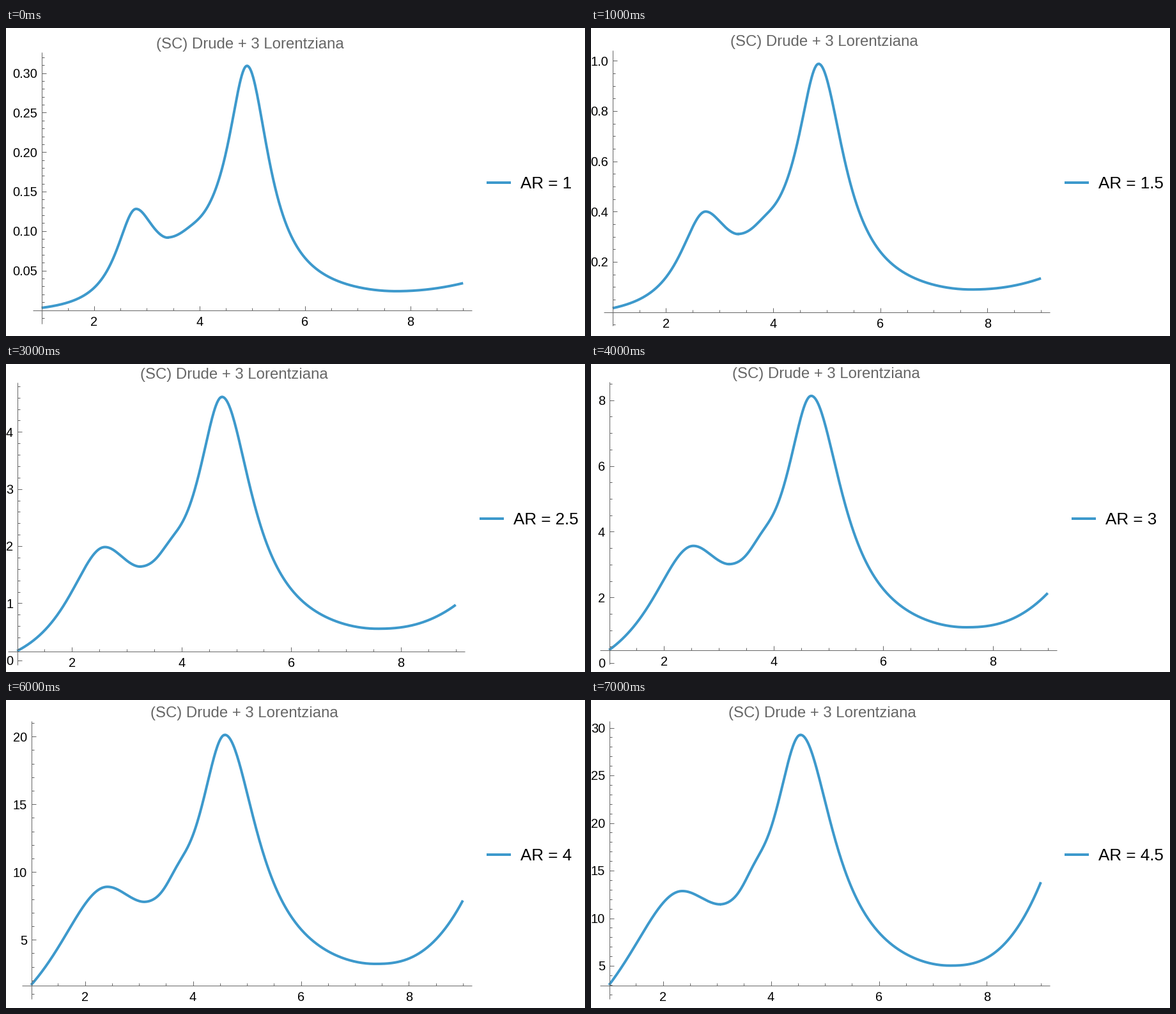
A matplotlib script that plays this animation: 906 px wide and 482 px high, repeating every 8 s.

```python
import numpy as np
import matplotlib.pyplot as plt
from matplotlib.animation import FuncAnimation

W, H, DPI = 906, 482, 64
PX = 72 / DPI  # points per pixel
BLUE, GRAY = "#3d99cc", "#666666"
FRAMES = 8
DIGIT, DOT = 11.12, 5.56  # advance widths in tick labels
plt.rcParams["font.family"] = "Liberation Sans"


def poly(w, *coeffs):
    return sum(c * w**i for i, c in enumerate(coeffs))


def lorentz(t, h):
    """Flank of a resonance of half width h, from 0 at t=0 to 1 at t=1."""
    return (1 + h * h) * t**2 / (t**2 + h * h)


def flank(t, h):
    """The same flank, levelled off at t=1."""
    return lorentz(t, h) + 2 * h * h / (1 + h * h) * t**3 * (1 - t)


def spectrum(ratio):
    """Curve joined from flanks between start, peak, dip, peak, valley, end."""
    u, w = ratio - 1, np.log(ratio) / np.log(4.5)
    mark_x = [
        1,
        poly(w, 2.795, -0.124, -0.314),
        poly(w, 3.395, -0.102, -0.237),
        poly(w, 4.900, -0.130, -0.222),
        poly(w, 7.730, -0.018, -0.402),
        9,
    ]
    mark_y = ratio**3 * np.array([
        poly(u, 0.0028, 0.00262, 0.0017),
        poly(w, 0.1281, -0.0763, 0.1738, -0.0845),
        poly(w, 0.0917, -0.0233, 0.1009, -0.0435),
        poly(w, 0.3093, -0.0977, 0.1431, -0.0336),
        poly(w, 0.0239, 0.0036, 0.0218, 0.0059),
        poly(u, 0.0341, 0.0077, 0.00737),
    ])
    t = np.linspace(0, 1, 150)
    shoulder = (0.016 + 0.042 * w) * np.exp(
        -((t - 0.28 - 0.14 * w) / 0.17)**2)
    parts = [
        1 - lorentz(1 - t, poly(ratio, 0.12, 0.12, 0.018)),
        flank(t, 0.65 + 0.2 * w),
        1 - flank(1 - t, 0.285 + 0.095 * w) + shoulder,
        flank(t, 0.18 + 0.092 * w),
        t**(2 + 0.65 * w),
    ]
    x = [a + (b - a) * t for a, b in zip(mark_x, mark_x[1:])]
    y = [a + (b - a) * f for a, b, f in zip(mark_y, mark_y[1:], parts)]
    return np.concatenate(x), np.concatenate(y), mark_y[0], mark_y[3]


def tick_rule(peak):
    """Major step, minor ticks per step and decimals for a given height."""
    power = 10.0**np.floor(np.log10(peak / 7))
    lead = next(m for m in (1, 2, 5, 10) if peak / (m * power) <= 7)
    step = lead * power
    decimals = max(0, -int(np.floor(np.log10(step) + 1e-9)))
    return step, 4 if lead == 2 else 5, decimals


fig = plt.figure(figsize=(W / DPI, H / DPI), dpi=DPI, facecolor="white")
ax = fig.add_axes([0, 0, 1, 1])


def line(x, y, color=GRAY, width=1):
    ax.plot(x, y, color=color, lw=width * PX, solid_capstyle="butt",
            solid_joinstyle="round")


def label(x, y, s, size, color="black", ha="center"):
    ax.text(x, y, s, fontsize=size * PX, color=color, ha=ha, va="baseline")


def draw(n):
    ax.clear()
    ax.set(xlim=(0, W), ylim=(H, 0))
    ax.axis("off")
    ratio = 1 + n / 2
    xs, ys, low, peak = spectrum(ratio)
    base = low if low > 0.03 * peak else 0
    step, parts, decimals = tick_rule(peak)

    # the widest tick label and the legend set the sides of the plot
    shift = 11 if ratio == int(ratio) else 0
    widest = f"{int(peak / step) * step:.{decimals}f}"
    text_w = DIGIT * len(widest) - (DIGIT - DOT) * ("." in widest)
    left, right = text_w - 8.1 + shift, 718 + shift
    width = right - left
    height = width * 0.618
    unit = 0.9 * height / (peak - base)

    # centred vertically, moved up where a zero label hangs below the others
    hang = max(0, base * unit - 17.5) if base < step / 4 else 0
    top = 250.3 - height / 2 - hang / 2
    bottom = top + height

    def px(x):
        return left + width * (0.02 + 0.12 * (x - 1))

    def py(y):
        return top + 0.95 * height - (y - base) * unit

    x0 = np.floor(px(1)) + 0.5
    y0 = np.floor(py(base)) + 0.5

    line(px(xs), py(ys), BLUE, 4)
    line([left, right], [y0, y0])
    line([x0, x0], [top, bottom])

    for i in range(3, 19):
        x, major = px(i / 2), i % 4 == 0
        line([x, x], [y0, y0 - (7 if major else 4)])
        if major:
            label(x, y0 + 24.7, str(i // 2), 20)

    for i in range(-parts, 8 * parts):
        value = i * step / parts
        y, major = py(value), i % parts == 0
        if not top <= y <= bottom or (i == 0 and base == 0):
            continue
        line([x0, x0 + (7 if major else 4)], [y, y])
        if major:
            label(x0 - 6.3, y + 7.3, f"{value:.{decimals}f}", 20, ha="right")

    label((left + right) / 2 - 4, top - 6.2, "(SC) Drude + 3 Lorentziana",
          24, GRAY)
    line([right + 23, right + 61], [241.7, 241.7], BLUE, 4)
    label(right + 76, 250.8, f"AR = {ratio:g}", 26, ha="left")
    return ax.get_children()


anim = FuncAnimation(fig, draw, frames=FRAMES, interval=1000,
                     repeat=True, repeat_delay=0)
plt.show()
```
